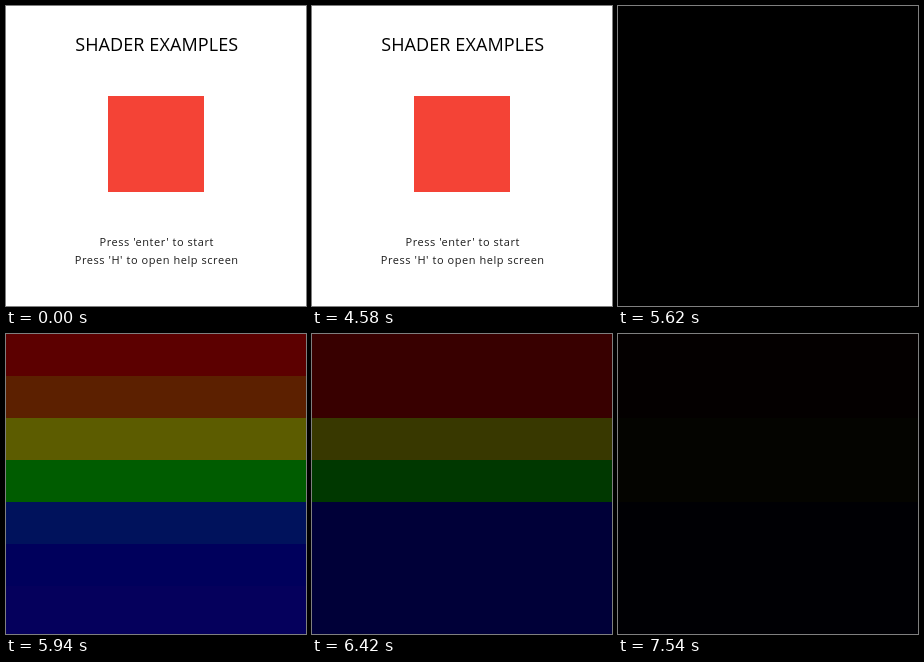
Write an HTML page with a canvas that moves like this. It is 300 px wide and 300 px high and loops after 8 s.

```html
<!DOCTYPE html>
<html lang="en">
<head>
<meta charset="utf-8">
<title>Shader examples</title>
<style>
  html, body { margin: 0; width: 100%; height: 100%; overflow: hidden; background: #fff; }
  canvas { display: block; }
</style>
</head>
<body>
<canvas id="stage" width="300" height="300"></canvas>
<script>
const ctx = document.getElementById("stage").getContext("2d");
const LOOP = 8000, HELP_ON = 500, HELP_OFF = 4580, SHADER_ON = 5620, STEP = 80;
const BAND = 42;

function clear(color) {
  ctx.fillStyle = color;
  ctx.fillRect(0, 0, 300, 300);
}

function text(str, y, size, spacing, color) {
  ctx.font = `${size}px "Open Sans", "Noto Sans", sans-serif`;
  ctx.letterSpacing = `${spacing}px`;
  ctx.textAlign = "center";
  ctx.fillStyle = color;
  ctx.fillText(str, 150.7, y);
}

const heading = str => text(str, 45, 18, 0.1, "#000");
const line = (str, y) => text(str, y, 11, 0.55, "#1c1c1c");

function titleScreen() {
  clear("#fff");
  heading("SHADER EXAMPLES");
  ctx.fillStyle = "#f44336";
  ctx.fillRect(102, 90, 96, 96);
  line("Press 'enter' to start", 240);
  line("Press 'H' to open help screen", 258);
}

function helpScreen() {
  clear("#fff");
  heading("HELP");
  line("Press 1 to run rainbow shader", 150);
  line("Press 2 to run hourglass shader", 168);
  line("Press 'H' to show or hide the help screen", 187);
}

// Rainbow bands dimmed by a slow cosine; weak channels vanish first.
function rainbow(t) {
  const n = Math.floor((t - SHADER_ON) / STEP);
  if (n < 1) return clear("#000");
  const phase = 1.7 + 0.65 * (n - 1) * STEP / 1000;
  const level = 255 * (1 + Math.cos(phase)) / 2;
  const weak = Math.min(1, Math.max(0, (level - 55) / 56));
  const bands = [
    [1, 0, 0],
    [1, 0.53 * weak, 0],
    [1, 1, 0],
    [level < 14 ? 1 : 0, 1, 0],
    [0, 0.3 * weak, 1],
    [0, 0, 1],
    [0.08 * weak, 0, 1]
  ];
  bands.forEach((rgb, i) => {
    ctx.fillStyle = `rgb(${rgb.map(c => Math.round(c * level)).join(",")})`;
    ctx.fillRect(0, i * BAND, 300, 300 - i * BAND);
  });
}

function draw(now) {
  const t = now % LOOP;
  if (t >= SHADER_ON) rainbow(t);
  else if (t >= HELP_ON && t < HELP_OFF) helpScreen();
  else titleScreen();
}

let start;
function frame(now) {
  start ??= now;
  draw(now - start);
  requestAnimationFrame(frame);
}
draw(0);
requestAnimationFrame(frame);
</script>
</body>
</html>
```
